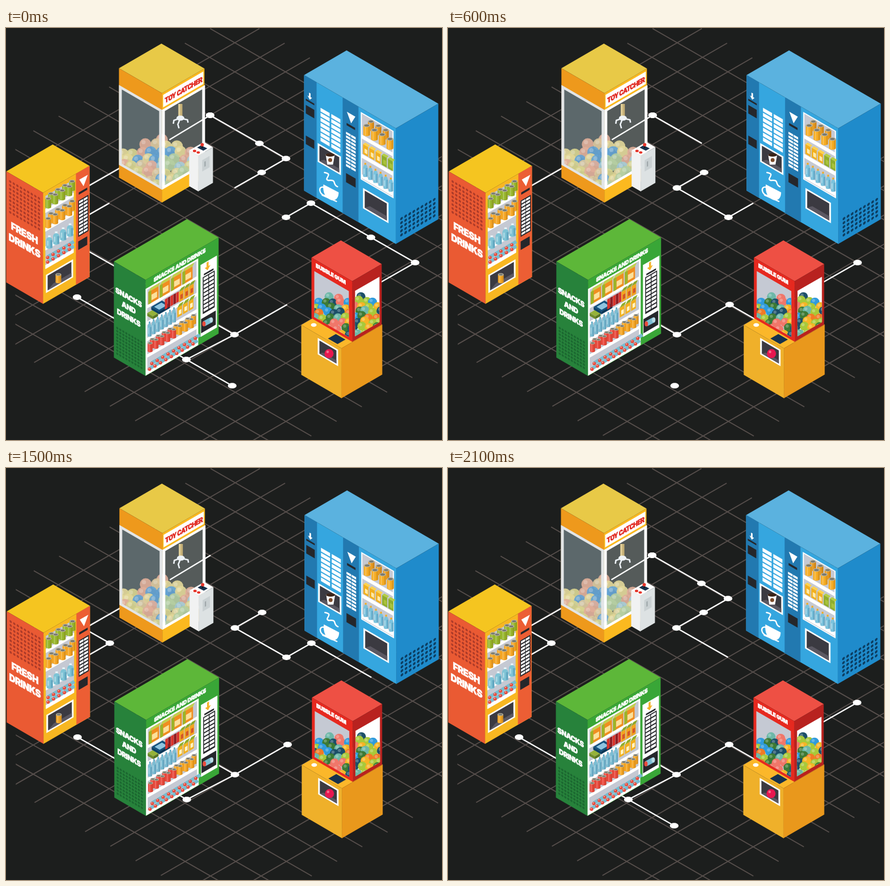
Animation, 770 px wide and 727 px high, one loop 2.4 s. Source, as an HTML page with a canvas:

```html
<!DOCTYPE html>
<html lang="en">
<head>
<meta charset="utf-8">
<title>Vending machines</title>
<style>
html, body { margin: 0; width: 100%; height: 100%; overflow: hidden; background: #1c1e1d; }
canvas { display: block; }
</style>
</head>
<body>
<canvas id="stage" width="770" height="727"></canvas>
<script>
const g = document.getElementById('stage').getContext('2d');
const S = 0.58; // slope of the machine edges
const INK = '#25272b', SHELF = '#c5c9d3';

// ---- drawing helpers ----
function trace(xy) {
  g.beginPath();
  for (let i = 0; i < xy.length; i += 2) g.lineTo(xy[i], xy[i + 1]);
}
function poly(color, ...xy) {
  g.fillStyle = color;
  trace(xy);
  g.fill();
}
function line(color, width, ...xy) {
  g.strokeStyle = color;
  g.lineWidth = width;
  trace(xy);
  g.stroke();
}
function rect(color, x, y, w, h) {
  g.fillStyle = color;
  g.fillRect(x, y, w, h);
}
function oval(color, x, y, rx, ry = rx) {
  g.fillStyle = color;
  g.beginPath();
  g.ellipse(x, y, rx, ry, 0, 0, 7);
  g.fill();
}
// draw in the coordinates of an upright isometric wall
function face(x, y, slope, draw) {
  g.save();
  g.transform(1, slope, 0, 1, x, y);
  draw();
  g.restore();
}
function block(x, y, a, b, h, [top, left, right], drawLeft, drawRight) {
  poly(top, x, y, x + b, y - S * b, x + a + b, y + S * (a - b), x + a, y + S * a);
  face(x, y, S, () => { rect(left, 0, 0, a + .4, h); drawLeft?.(); });
  face(x + a, y + S * a, -S, () => { rect(right, 0, 0, b, h); drawRight?.(); });
}
function panel(x, y, w, h, edge, inner) {
  rect('#fff', x, y, w, h);
  rect(inner, x + edge, y + edge, w - 2 * edge, h - 2 * edge);
}
function hatch(x, y, w, h) {
  panel(x, y, w, h, 3, '#3b3a41');
  poly('#5b5862', x + 3, y + h - 3, x + w * .27, y + h * .7, x + w - 3, y + h * .7, x + w - 3, y + h - 3);
}
// cells spread evenly over a box
function grid(cols, rows, x, y, w, h, draw) {
  for (let i = 0; i < cols * rows; i++)
    draw(x + w * (i % cols) / cols, y + h * Math.floor(i / cols) / rows, w / cols, h / rows);
}
const vents = (color, cols, rows, x, y, w, h, r) =>
  grid(cols, rows, x, y, w, h, (u, v) => oval(color, u, v, r));
const keypad = (cols, rows, x, y, w, h, gap) =>
  grid(cols, rows, x, y, w, h, (u, v, cw, ch) => rect('#fff', u, v, cw - gap, ch - 2.2));
function row(n, x, y, dx, slope, draw) {
  for (let i = 0; i < n; i++) draw(x + i * dx, y + i * dx * slope, i);
}
function triangle(x, y) {
  poly('#fff', x, y, x + 15, y, x + 7.5, y + 16);
}
function arrow(color, x, y, s) {
  rect(color, x - s * .35, y, s * .7, s * 1.8);
  poly(color, x - s, y + s * 1.6, x + s, y + s * 1.6, x, y + s * 2.9);
}
function label(text, x, y, dir, size, color, gap, font = 'Inter') {
  g.save();
  g.transform(.866, dir * .5, 0, 1, x, y);
  g.font = `900 ${size}px ${font}, sans-serif`;
  g.letterSpacing = gap + 'px';
  g.textAlign = 'center';
  g.textBaseline = 'middle';
  g.fillStyle = g.strokeStyle = color;
  g.lineWidth = .6;
  g.fillText(text, 0, 0);
  g.strokeText(text, 0, 0);
  g.restore();
}

// ---- goods ----
function can(x, y, w, h, color) {
  const r = w / 2, e = w / 4;
  oval(color, x, y + h, r, e);
  rect(color, x - r, y, w, h);
  rect('rgba(255,255,255,.22)', x - r * .6, y, w * .2, h + e * .7);
  rect('rgba(90,40,0,.16)', x + r * .4, y, w * .3, h + e * .6);
  oval('#b9b3a0', x, y, r, e);
  oval('#77786f', x, y, r * .7, e * .6);
}
function bottle(x, y, w, h, color, cap) {
  const r = w / 2;
  rect(cap, x - r * .4, y - 3, r * .8, 5);
  oval(color, x, y + h * .3, r, h * .3);
  oval(color, x, y + h, r, r * .5);
  rect(color, x - r, y + h * .3, w, h * .7);
  rect('rgba(20,90,130,.25)', x + r * .3, y + h * .3, r * .7, h * .75);
  rect('rgba(255,255,255,.4)', x - r * .7, y + h * .35, r * .4, h * .5);
}
function carton(x, y, w, h, slope, front, top, tag) {
  face(x, y, slope, () => {
    poly(top, 0, 0, 4, -5, w + 3, -5, w, 0);
    rect(front, 0, 0, w, h);
    rect(tag, w * .3, h * .35, w * .55, h * .45);
  });
}
function lying(x, y) {
  line('#79bdd0', 6, x, y, x + 8, y - 5);
  oval('#e94b3c', x, y + 1, 3);
  oval('#fff', x - .7, y, .8);
}
// heap of balls below a peak, seen through panes [x, y, slope, u, v, w, h]
function heap(colors, r, peakX, peakY, fall, seed, ...panes) {
  const random = () => (seed = seed * 16807 % 2147483647) / 2147483647;
  const wobble = () => (random() - .5) * r * .6;
  g.save();
  g.beginPath();
  for (const [x, y, slope, ...box] of panes) face(x, y, slope, () => g.rect(...box));
  g.clip();
  for (let y = peakY, shift = 0; y < peakY + 90; y += r * 1.15, shift = r * .8 - shift)
    for (let x = peakX - 80 + shift; x < peakX + 80; x += r * 1.6) {
      const u = x + wobble(), v = y + wobble();
      const color = colors[Math.floor(random() * colors.length)];
      if (v < peakY - 2 + Math.abs(u - peakX) * fall) continue;
      oval(color, u, v, r);
      oval('rgba(255,255,255,.25)', u - r * .3, v - r * .35, r * .35);
    }
  g.restore();
}

// ---- network ----
// runs along the isometric axes to each x; a minus sign means upwards
function walk(x, y, ...stops) {
  const route = [[x, y]];
  for (const stop of stops) {
    const next = Math.abs(stop);
    y += Math.sign(stop) * Math.abs(next - x) * .57;
    route.push([x = next, y]);
  }
  return route;
}
const loop = walk(361, 154, 448, 495, 452, 404, 495, -539, 645, 723, 545, -497, 404,
  -280, -90, -183, -138, -289);
const dotted = 'xxxxxxxxx-xx--x--'; // the other corners lie behind machines
const [K, M, N] = walk(126, 475, 319, 400);
const L = loop[11];
const branch = [[K], [K, M], [L, M], [M], [M, N], [N]];

const STEP = 300;
// hidden stretches of the loop: corner n at 2n, the link after it at 2n + 1
const gaps = [
  '8-9 19-20 28-29', '4-7 15-17 27-29', '2-5 12-15 25-29', '12-13 22-27 33.3-35',
  '6-9 16-21 31-33', '0-5 14-19 25', '12-17 25 33-35', '10-15 25'
].map(step => step.split(' ').map(gap => gap.split('-').map(Number)));
// visible slice of the branch
const slices = [[0, 6], [3, 6], [5, 6], [0, 0], [0, 0], [0, 4], [0, 6], [0, 6]];

function mark(a, b) {
  if (b) line('#fff', 2.3, ...a, ...b);
  else oval('#fff', ...a, 7.6, 4.9);
}
function drawLoop(step, from, to) {
  const size = loop.length * 2;
  const hidden = i => gaps[step].some(([a, b = a]) =>
    (i >= a && i <= b) || (i + size >= a && i + size <= b));
  for (let i = from; i < to; i++) {
    if (hidden(i)) continue;
    const n = i >> 1, a = loop[n], b = loop[(n + 1) % loop.length];
    const cut = gaps[step].find(([start]) => start > i && start < i + 1);
    const part = cut ? cut[0] - i : 1;
    if (i % 2) mark(a, a.map((c, k) => c + (b[k] - c) * part));
    else if (dotted[n] === 'x') mark(a);
  }
}

// ---- scene ----
function floor() {
  rect('#1c1e1d', 0, 0, 770, 727);
  g.save();
  g.beginPath();
  g.rect(17, 0, 753, 727);
  g.clip();
  for (let k = 0; k < 15; k++) {
    const dx = 44.6 * k, dy = 25.75 * k;
    line('#574f4c', 1.8, 361 - dx, 1 + dy, 1075 - dx, 411 + dy);
    line('#574f4c', 1.8, 448 + dx, 1 + dy, -262 + dx, 410 + dy);
  }
  g.restore();
}

function clawMachine(step) {
  const pane = color => {
    g.strokeStyle = color;
    g.lineWidth = 5;
    g.strokeRect(2.5, 32, 71, 136);
  };
  block(200, 71, 76, 75, 193, ['#e8c947', '#ee991c', '#fbb91f'],
    () => rect('#5c686b', 0, 31, 76, 138),
    () => {
      rect('#555b5a', 0, 30, 75, 138);
      rect('#fff', 2, 4, 71, 22);
    });
  label('TOY CATCHER', 314, 110, -1, 12.5, '#e0281f', -.6, 'Roboto');
  g.globalAlpha = .9;
  heap(['#e3d79a', '#dcc89e', '#a5ccd6', '#b5cfa2', '#e0ae9a', '#64a4d4', '#d9d48f'], 10.5, 270, 196, .36, 77,
    [200, 71, S, 2, 31, 74, 136], [276, 115, -S, 0, 31, 73, 136]);
  g.globalAlpha = 1;
  rect('#c6b077', 305, 134, 7, 23);
  rect('#e2d09a', 305, 134, 3, 23);
  const claw = '#eef3f8';
  oval(claw, 308.5, 159, 7, 4.5);
  line(claw, 2.6, 296, 169, 297, 163, 308, 159, 321, 162, 322, 167);
  line(claw, 2.6, 308, 160, 304, 170, 306, 177);
  drawLoop(step, 33, 34);
  drawLoop(step, 0, 1);
  face(200, 71, S, () => pane('#e3e5e6'));
  face(276, 115, -S, () => pane('#fff'));
  block(324, 216, 16, 26, 63, ['#fff', '#f1f2f2', '#dde2e3'], null, () => {
    rect('#c9d0d2', 7, 12, 13, 20);
    rect('#9aa3a6', 11, 17, 2, 9);
  });
  face(338, 211, -S, () => poly('#17324d', 0, 0, 7, 0, 18, 12, 11, 12));
  line('#111', 1.6, 347, 212, 347, 206);
  oval('#e5352a', 347, 206, 3);
  row(2, 333.5, 217, 6.5, .4, (x, y) => oval('#e5352a', x, y, 3, 2.2));
}

function cupSign() {
  g.save();
  g.translate(572, 288);
  g.strokeStyle = g.fillStyle = '#fff';
  g.lineCap = 'round';
  g.lineWidth = 2.4;
  g.stroke(new Path2D('M-9-33C8-30-12-22-2-19C14-21 4-12 14-8'));
  g.stroke(new Path2D('M-10-7C-22-10-18 8-7 8M-13 7L12 18'));
  g.fill(new Path2D('M-11-12L16 2C16 16 6 19-2 13C-10 8-12-2-11-12'));
  g.restore();
}

function coffeeMachine() {
  const dark = '#2279b0';
  block(527, 83, 162, 75, 204, ['#5bb2df', '#35a6df', '#1f8bcb'], () => {
    rect(dark, 0, 0, 22, 204);
    rect(dark, 68, 0, 28, 204);
    arrow('#fff', 10, 26, 4);
    rect(INK, 3, 40, 15, 3);
    rect(INK, 3, 51, 15, 15);
    rect(INK, 3, 105, 15, 15);
    keypad(2, 7, 29, 41, 38, 61, 3);
    triangle(75.5, 21);
    rect(INK, 75, 41, 15, 4);
    keypad(2, 10, 74, 57, 18, 63, 1);
    rect(INK, 74, 130, 17, 16);
    hatch(24, 106, 41, 33);
    panel(100, 7, 58, 119, 2, SHELF);
    for (const v of [46, 80, 116]) rect('#fff', 101, v, 56, 7);
    hatch(104, 139, 45, 36);
  }, () => vents('#0c3e62', 9, 5, 10, 165, 65, 36, 2.4));
  row(3, 645, 165, 13, S, (x, y) => can(x, y, 11, 14, '#e79a20'));
  row(4, 637.5, 172, 13.7, S, (x, y) => can(x, y, 12, 16, '#f6ad24'));
  row(5, 631, 205, 11, S, (x, y, i) => i < 3
    ? carton(x, y, 9, 17, S, '#f2b01e', '#ffd24d', '#ffe9a6')
    : carton(x, y, 9, 17, S, '#8fae2b', '#b4cd45', '#a9c23c'));
  row(6, 635, 241, 9, S, (x, y) => bottle(x, y, 8, 20, '#7cc3dd', '#f0ad2c'));
  poly('#fff', 565, 223, 581, 224, 578, 241, 568, 241);
  oval('#3a2418', 573, 224, 8, 3);
  oval('#7a4a2a', 573, 233, 3.5);
  cupSign();
}

function drinksMachine() {
  block(1, 253, 65, 82, 196, ['#f5c520', '#ea5a33', '#f8b721'],
    () => vents('#ad3b29', 9, 9, 7, 14, 57, 61, 2.1),
    () => {
      rect('#ec5e34', 58, 0, 24, 196);
      rect(SHELF, 4, 8, 50, 128);
      for (let i = 0; i < 4; i++) rect('#fff', 4, 31 + 33 * i, 50, 7);
      hatch(5, 148, 48, 32);
      triangle(64, 14);
      rect(INK, 63, 36, 15, 4);
      rect(INK, 62, 50, 18, 64);
      keypad(2, 10, 63.5, 52, 16, 62, 1);
      rect(INK, 62, 122, 16, 15);
    });
  label('FRESH', 33, 363, 1, 17.5, '#fff', -.5);
  label('DRINKS', 33, 385, 1, 17.5, '#fff', -.6);
  ['#97b62c', '#f5a624'].forEach((color, i) => {
    for (const back of [1, 0])
      row(4, 75 + 5 * back, 301 + 35 * i - 9 * back, 12.4, -S, (x, y) => can(x, y, 10.5, 15, color));
  });
  row(4, 77, 369, 12.2, -S, (x, y) => bottle(x, y, 11, 18, '#7fc4d6', '#e8f4f8'));
  for (const d of [0, 8]) row(5, 74, 404 + d, 9.6, -S, lying);
  can(93, 435, 10, 13, '#f2a624');
}

function snackMachine() {
  block(191, 412, 56, 129, 169.5, ['#5db739', '#27823b', '#39a637'],
    () => vents('#1b6730', 9, 9, 6, 114, 48, 51, 1.9),
    () => {
      rect('#fff', 0, 16, 93, 153);
      rect(SHELF, 3, 19, 87, 145);
      for (let i = 0; i < 5; i++) rect('#fff', 2, 46 + 29 * i, 89, 6);
      rect('#fff', 97, 30, 29, 127);
      arrow('#f3b229', 109.5, 32, 5);
      rect(INK, 103, 49, 17, 3);
      rect(INK, 101, 54, 21, 65);
      keypad(2, 9, 102.5, 56, 19.4, 62, 1.4);
      rect(INK, 98, 126, 26, 25);
    });
  ['SNACKS', 'AND', 'DRINKS'].forEach((word, i) => label(word, 217, 476 + 18 * i, 1, 13, '#fff', -.5));
  label('SNACKS AND DRINKS', 307, 419, -1, 10.2, '#fff', -.3);
  row(4, 252, 466, 20, -S, (x, y) => {
    carton(x, y, 18, 22, -S, '#f08e20', '#c3d04a', '#fbe09a');
    face(x, y, -S, () => rect('#9ab52a', 0, 0, 5, 22));
  });
  block(250, 503, 10, 9, 5, ['#95b23a', '#6d8b2a', '#587423']);
  block(257, 492, 14, 19, 5, ['#0f4f7c', '#0d4166', '#0b3656']);
  block(262, 492, 9, 13, 0, ['#8fc4e0']);
  row(5, 281, 479, 5, -S, (x, y, i) =>
    face(x, y, -S, () => rect(i % 2 ? '#8f1d22' : '#d9322a', 0, 0, 4.6, 18)));
  row(3, 306, 466, 9, -S, (x, y) => carton(x, y, 8, 18, -S, '#f2a51f', '#8da82a', '#d4572a'));
  row(7, 254, 521, 7.2, -S, (x, y) => bottle(x, y, 6.8, 22, '#7cbdd3', '#5ea9c4'));
  row(3, 303, 494, 10, -S, (x, y) => carton(x, y, 8.5, 17, -S, '#f2b01e', '#8fae2b', '#fff3c4'));
  for (const back of [1, 0])
    row(8, 255 + 4 * back, 556 - 7 * back, 10.4, -S, (x, y, i) =>
      can(x, y, 8.6, 14, i < 5 - back ? '#e9493d' : '#f5a624'));
  for (const d of [0, 10]) row(9, 254 + d * .4, 601 - d, 9.6, -S, lying);
  line('#7cbdd3', 9, 350, 522, 363, 515);
  oval('#e94b3c', 350, 522, 3, 4.5);
  oval('#b9dbe5', 363, 515, 3, 4.5);
}

function gumMachine() {
  const colors = ['#2f9bdc', '#f6b425', '#a8c93a', '#1c4f68', '#f07a24', '#3c7a35', '#6db8a8', '#f0776a'];
  block(522, 524, 71, 72, 88, ['#fbb72a', '#efb02a', '#e9981c'], () => hatch(29, 6, 36, 29));
  oval('#e8174f', 571, 574.5, 8);
  oval('#f4718f', 568.5, 571.5, 2.2);
  block(569, 548, 17, 14, 0, ['#17324d']);
  block(540, 405, 72, 52, 107, ['#ee5044', '#e6291f', '#b8221f'],
    () => rect(SHELF, 5, 21, 61, 81),
    () => rect('#fff', 5, 20, 43, 80));
  heap(colors, 8, 583, 466, .66, 4242, [540, 405, S, 5, 21, 61, 81]);
  heap(colors, 8, 620, 473, .4, 913, [612, 446.8, -S, 5, 20, 43, 80]);
  label('BUBBLE GUM', 574, 434.5, 1, 9.8, '#fff', -.3);
  oval('#fff', 544, 524, 5, 3.2);
}

function draw(step) {
  const drift = step % 7 % 3 * .4 - .5;
  g.setTransform(1, 0, 0, 1, drift, 0);
  floor();
  drawLoop(step, 0, 33);
  branch.slice(...slices[step]).forEach(part => mark(...part));
  clawMachine(step);
  coffeeMachine();
  drinksMachine();
  snackMachine();
  gumMachine();
}

let shown = -1;
const start = performance.now();
function tick() {
  const step = Math.floor((performance.now() - start) / STEP) % gaps.length;
  if (step !== shown) draw(shown = step);
  requestAnimationFrame(tick);
}
tick();
</script>
</body>
</html>
```
